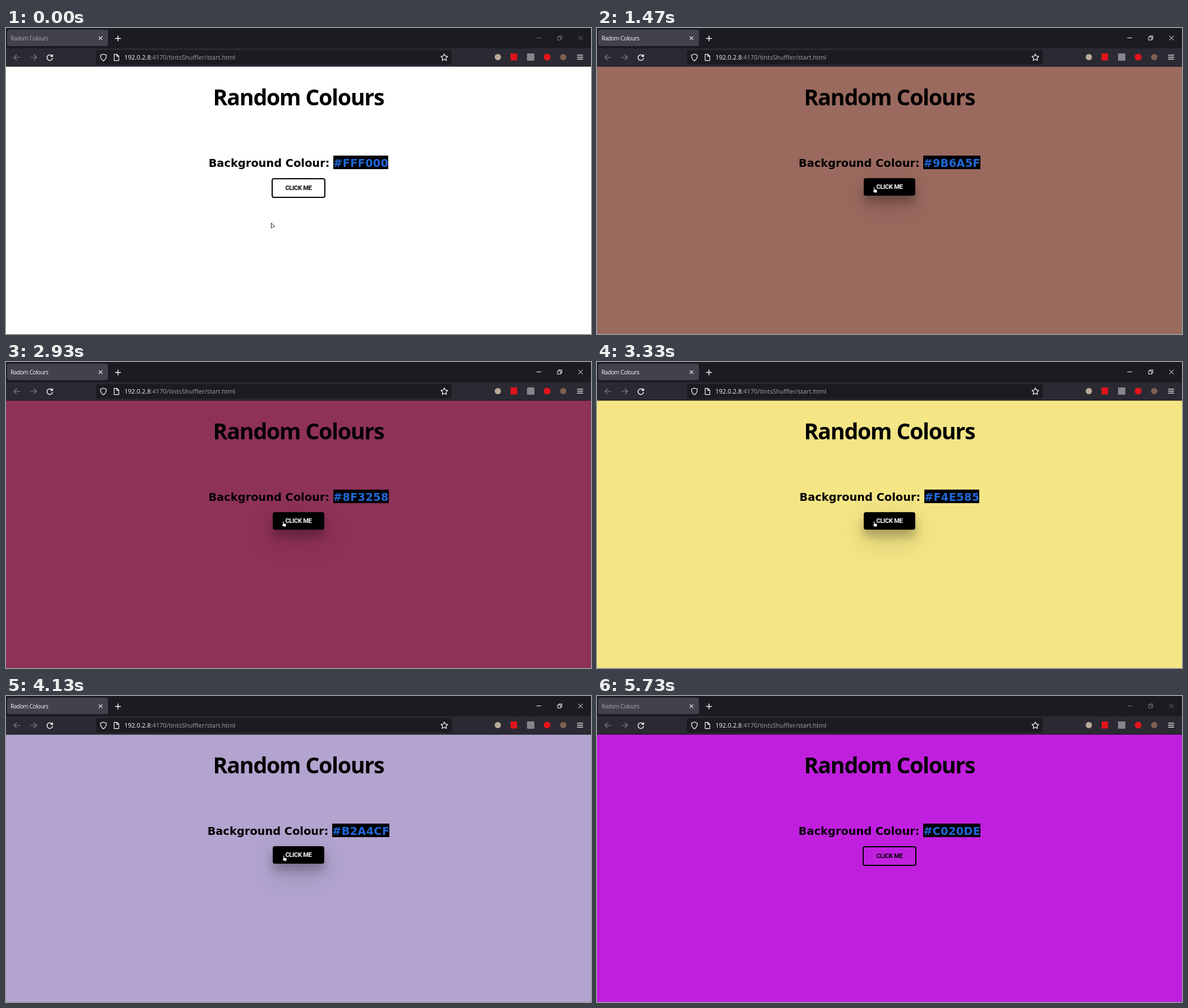
An HTML page for the animation above (5790 ms loop, 1033 by 542 pixels).

```html
<!DOCTYPE html>
<html lang="en">
<head>
<meta charset="utf-8">
<title>Random Colours</title>
<style>
  html, body { margin: 0; width: 100%; height: 100%; overflow: hidden; background: #fff; }
  body { position: relative; cursor: default; }
  svg { position: absolute; left: 0; top: 0; display: block; }
  h1, h2, #btn { position: absolute; margin: 0; color: #000; text-align: center; white-space: nowrap; }
  h1, h2 { left: 0; width: 1033px; }
  h1 { top: 95px; font: 700 39px/54px "Open Sans", "Noto Sans", sans-serif; letter-spacing: -1.3px; }
  h2 { top: 226px; font: 700 19.2px/27px "DejaVu Sans", sans-serif; }
  #hex {
    display: inline-block; height: 24px; vertical-align: top;
    background: #000; color: #2068d8; letter-spacing: .25px;
  }
  #btn {
    left: 469px; top: 266px; width: 95px; height: 35px; box-sizing: border-box;
    border: 2px solid #000; border-radius: 4px;
    font: 700 11px/31px Roboto, sans-serif; letter-spacing: -.3px;
  }
  #btn.hover { left: 471px; width: 91px; height: 31px; border: 0; background: #000; color: #fff; }
  text { font-family: "Open Sans", "Noto Sans", sans-serif; }
</style>
</head>
<body>
<h1>Random Colours</h1>
<h2>Background Colour: <span id="hex"></span></h2>
<div id="btn">CLICK ME</div>

<svg width="1033" height="542" viewBox="0 0 1033 542">
  <rect width="1033" height="36" fill="#1c1b22"/>
  <rect y="36" width="1033" height="32" fill="#2b2a33"/>
  <rect y="67.4" width="1033" height="1" fill="#131217"/>
  <rect x="2" y="3" width="178" height="29" rx="3.5" fill="#42414d"/>
  <rect x="159" y="39" width="628" height="26" rx="3.5" fill="#1c1b22"/>

  <text id="tab" x="8" y="22" font-size="10" letter-spacing="-.4">Radom Colours</text>
  <text x="209" y="56.3" font-size="11" fill="#a3a2a9"><tspan fill="#fbfbfe">192.0.2.8</tspan>:4170/tintsShuffler/start.html</text>

  <g fill="none" stroke="#fbfbfe" stroke-width="1.2" stroke-linecap="round" stroke-linejoin="round">
    <path d="M164.3 15.3l5.4 5.4m0-5.4l-5.4 5.4"/>
    <path d="M193.2 18.5h9M197.7 14v9" stroke-width="1.4"/>
    <g stroke="#85848b">
      <path d="M24.5 52H14m4.7-4.7L14 52l4.7 4.7"/>
      <path d="M43.5 52H54m-4.7-4.7L54 52l-4.7 4.7"/>
    </g>
    <path d="M81.6 49.6a5 5 0 1 0 .7 4.2" stroke-width="1.4"/>
    <path d="M82.6 47.2v3.6h-3.6z" fill="#fbfbfe" stroke-width=".8"/>
    <path d="M172 46.2l5.2 1.9c0 4.6-1.2 7.9-5.2 10-4-2.1-5.2-5.4-5.2-10z"/>
    <path d="M191 46.6h4.8l3.4 3.4v7.6h-8.2zM195.6 46.8v3.4h3.4"/>
    <path id="star"/>
    <path d="M1009 48.2h9.5M1009 51.7h9.5M1009 55.2h9.5" stroke-width="1.3"/>
  </g>
  <path id="win" d="M936.5 17.5h8.5M974 15.8h5.5v5.5h-5.5zM976 15.5v-1.5h5.5v5.5h-1.8M1010.5 13.7l8 8m0-8l-8 8" fill="none" stroke-width="1"/>

  <circle cx="868.5" cy="51.5" r="5.5" fill="#b9aa98"/>
  <rect x="891" y="45" width="11.5" height="12.5" fill="#e0151c"/>
  <rect x="920" y="45" width="13" height="13" rx="1.5" fill="#85868b"/>
  <circle cx="955.5" cy="51.5" r="6" fill="#e3141c"/>
  <circle cx="984" cy="51.5" r="5.5" fill="#7d6150"/>

  <g id="cursor" stroke="#111" stroke-width=".9" stroke-linejoin="round" fill="#fff">
    <path id="arrow" d="M.5 .5V9.4L3.3 7.3L6.6 6.5Z"/>
    <path id="hand" stroke-width=".6" d="M-.8 .4Q0-.4 .8 .4V3.8L4.4 4.5Q5.5 4.9 5.3 6L4.5 9.8H.2L-2.2 6.6Q-2.3 5.2-.8 6Z"/>
  </g>
</svg>

<script>
const $ = id => document.getElementById(id);
const LOOP = 5790, TICK = 1000 / 15;
const clicks = [
  [930, '#47748C'], [1470, '#9B6A5F'], [2070, '#45542C'], [2530, '#6E8A7B'],
  [2930, '#8F3258'], [3070, '#A77E62'], [3330, '#F4E585'], [3530, '#8C9A76'],
  [3730, '#A5828E'], [3930, '#7F95B0'], [4130, '#B2A4CF'], [4330, '#C020DE']
];
const clamp = v => Math.max(0, Math.min(1, v));
const ease = v => { v = clamp(v); return v * v * (3 - 2 * v); };
const mix = (a, b, u) => a + (b - a) * u;

// Star outline
$('star').setAttribute('d', 'M' + Array.from({ length: 10 }, (_, i) => {
  const a = i * Math.PI / 5, r = i % 2 ? 3.2 : 6.3;
  return (774 + r * Math.sin(a)).toFixed(1) + ' ' + (52.3 - r * Math.cos(a)).toFixed(1);
}).join('L') + 'Z');

// Pointer tip at a given tick
function pointer(k) {
  if (k < 54) {
    const u = ease(k / 10);
    return [mix(468, 489.5, u), mix(345, 282, u)];
  }
  if (k <= 73) {
    const u = ease((k - 65) / 8);
    return [mix(490.5, 105, u), mix(282.5, 487, u)];
  }
  return [105 - 16.7 * (k - 73), 487 + 17 * (k - 73)];
}

// Hover shadow strength, 0 to 1
function shadow(t, k) {
  if (t < 930) return 0.1 * Math.max(0, Math.min(k, 10) - 7);
  return clamp(1 - (k - 67) / 6);
}

function draw(t) {
  const k = Math.floor((t + 4) / TICK);
  const last = clicks.filter(c => t >= c[0]).pop();
  document.body.style.background = last ? last[1] : '#fff';
  $('hex').textContent = last ? last[1] : '#FFF000';

  const focused = t >= 930 && t < 5730;
  $('tab').setAttribute('fill', focused ? '#fbfbfe' : '#aaa9b1');
  $('win').setAttribute('stroke', focused ? '#fbfbfe' : '#77767d');

  const [x, y] = pointer(k);
  const over = x > 470 && x < 563 && y > 266 && y < 300;
  $('cursor').setAttribute('transform', `translate(${x.toFixed(1)} ${y.toFixed(1)})`);
  $('cursor').style.display = k < 77 ? '' : 'none';
  $('hand').style.display = over ? '' : 'none';
  $('arrow').style.display = over ? 'none' : '';

  const s = shadow(t, k);
  const layer = (dy, blur, a) => `0 ${dy * s}px ${blur * s}px rgba(0,0,0,${(a * s).toFixed(3)})`;
  $('btn').className = over ? 'hover' : '';
  $('btn').style.boxShadow = s ? layer(12, 16, .24) + ',' + layer(17, 50, .19) : 'none';
}

const start = performance.now();
function loop() {
  draw((performance.now() - start) % LOOP);
  requestAnimationFrame(loop);
}
draw(0);
requestAnimationFrame(loop);
</script>
</body>
</html>
```
